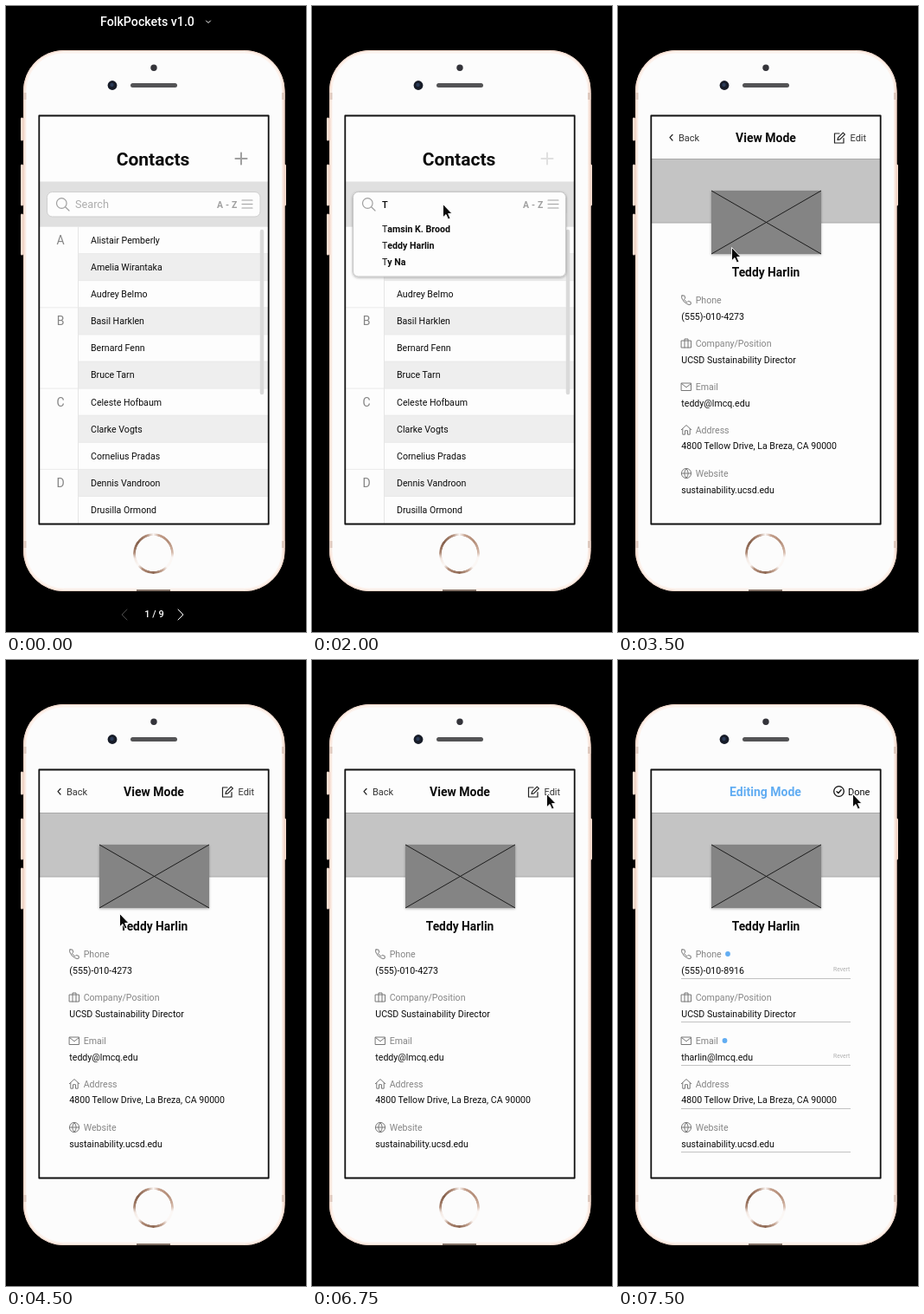
An HTML page for the animation above (8000 ms loop, 347 px wide and 722 px high).

```html
<!DOCTYPE html>
<html lang="en">
<head>
<meta charset="utf-8">
<title>Contacts prototype</title>
<style>
  html, body { margin: 0; width: 100%; height: 100%; overflow: hidden; background: #000; }
  svg { position: absolute; left: 0; top: 0; display: block; }
  text { font: 10.6px Roboto, Arial, sans-serif; fill: #0c0c0c; white-space: pre; }
  .bold { font-weight: 700; }
  .mid { text-anchor: middle; }
  .grey { fill: #858585; }
  .icon { fill: none; stroke-linecap: round; stroke-linejoin: round; }
  .title { font-size: 14px; font-weight: 700; text-anchor: middle; }
  .revert { font-size: 6.8px; fill: #b0b0b0; }

  .home {
    position: absolute; left: 147px; top: 608px; width: 47px; height: 47px; border-radius: 50%;
    background: conic-gradient(#fbf7f5, #c4a08d 18deg, #b38d78 50deg, #d3b7a7 85deg, #fbf7f5 102deg,
      #fbf7f5 135deg, #c9ab9a 150deg, #8f6a55 180deg, #b08b77 215deg, #fbf7f5 232deg, #f3e9e3 255deg,
      #a5806c 275deg, #86614d 305deg, #b28f7c 340deg, #fbf7f5);
    -webkit-mask: radial-gradient(circle, #0000 20.2px, #000 20.8px);
    mask: radial-gradient(circle, #0000 20.2px, #000 20.8px);
  }

  /* Scene changes: search opens at 2 s, card at 3.5 s, editing at 7.25 s */
  .chrome, .idle, .list, .find, .card, .view, .edit, .cursor { animation: 8s step-end infinite; }
  .chrome, .idle { animation-name: untilSearch; }
  .list { animation-name: untilCard; }
  .find { animation-name: search; }
  .card { animation-name: fromCard; }
  .view { animation-name: viewing; }
  .edit { animation-name: editing; }
  .cursor { animation-name: move; }
  @keyframes untilSearch { 0% { visibility: visible } 25%, 100% { visibility: hidden } }
  @keyframes untilCard { 0% { opacity: 1 } 43.75%, 100% { opacity: 0 } }
  @keyframes search { 0% { visibility: hidden } 25% { visibility: visible } 43.75%, 100% { visibility: hidden } }
  @keyframes fromCard { 0% { opacity: 0 } 43.75%, 100% { opacity: 1 } }
  @keyframes viewing { 0% { visibility: visible } 90.625%, 100% { visibility: hidden } }
  @keyframes editing { 0% { visibility: hidden } 90.625%, 100% { visibility: visible } }
  @keyframes move {
    0% { visibility: hidden; transform: translate(256px, 41px) }
    3.125% { visibility: visible; transform: translate(256px, 41px) }
    6.25% { transform: translate(249px, 78px) }
    9.375% { transform: translate(238px, 122px) }
    12.5% { transform: translate(224px, 160px) }
    15.625% { transform: translate(213px, 174px) }
    18.75% { transform: translate(186px, 204px) }
    21.875% { transform: translate(160px, 226px) }
    25% { transform: translate(151px, 228px) }
    28.125% { transform: translate(151px, 238px) }
    31.25% { transform: translate(151px, 261px) }
    34.375% { transform: translate(140px, 271px) }
    37.5% { transform: translate(131px, 278px) }
    53.125% { transform: translate(129px, 271px) }
    56.25% { transform: translate(131px, 292px) }
    59.375% { transform: translate(132px, 326px) }
    62.5% { transform: translate(132px, 368px) }
    65.625% { transform: translate(132px, 398px) }
    68.75% { transform: translate(145px, 433px) }
    71.875% { transform: translate(174px, 387px) }
    75% { transform: translate(215px, 300px) }
    78.125% { transform: translate(253px, 204px) }
    81.25%, 100% { visibility: visible; transform: translate(271px, 154px) }
  }
</style>
</head>
<body>
<svg width="347" height="722" viewBox="0 0 347 722">
  <defs>
    <linearGradient id="rim" x2="1" y2="0">
      <stop stop-color="#f5ddd1"/><stop offset=".012" stop-color="#fdf2ec"/>
      <stop offset=".988" stop-color="#fdf2ec"/><stop offset="1" stop-color="#f3d9cc"/>
    </linearGradient>
    <filter id="shade" x="-10%" y="-15%" width="120%" height="135%">
      <feDropShadow dx="0" dy="1" stdDeviation="1.8" flood-opacity=".32"/>
    </filter>
    <clipPath id="screen"><path d="M39 127H303V597H39Z"/></clipPath>
  </defs>
  <path d="M0 0H347V722H0Z"/>

  <g class="chrome">
    <text class="mid" x="163.5" y="23" style="font-size:14.2px;font-weight:500;fill:#fff">FolkPockets v1.0</text>
    <text class="mid" x="171.5" y="705" style="font-size:11px;font-weight:500;fill:#fff">1 / 9</text>
    <g class="icon" stroke="#fff">
      <path d="M231.5 17L234 19.5L236.5 17"/>
      <path d="M199 696L205 702L199 708"/>
      <path d="M140 696L134 702L140 708" stroke="#4a4a4a"/>
    </g>
  </g>

  <!-- Phone -->
  <path d="M18.5 130V154M18.5 184V229M18.5 241V286M322.5 184V229" stroke="#f4dccf" stroke-width="3" stroke-linecap="round"/>
  <rect x="20" y="51" width="302.5" height="624" rx="47" fill="url(#rim)"/>
  <rect x="20.5" y="51.5" width="301.5" height="623" rx="46.5" fill="none" stroke="#efd3c5"/>
  <path d="M20 104H24M318.5 104H322.5M20 621H24M318.5 621H322.5" stroke="#dfc9be" stroke-width="8"/>
  <rect x="23.5" y="54.5" width="295.5" height="617" rx="43.5" fill="#fcfcfc"/>
  <path d="M151 674H190" stroke="#59483f" stroke-width="1.6"/>
  <circle cx="171" cy="71.3" r="3.7" fill="#34343a"/>
  <circle cx="123" cy="91.5" r="5.4" fill="#171c28"/>
  <circle cx="122.5" cy="91" r="2.2" fill="#2b3b58"/>
  <rect x="144" y="89" width="54" height="5" rx="2.5" fill="#535355"/>
  <path d="M39 127H303V597H39Z" fill="#fdfdfd"/>

  <g clip-path="url(#screen)">
    <g class="list">
      <text class="title" x="170" y="183.5" style="font-size:21px">Contacts</text>
      <g class="icon" stroke-width="2">
        <path d="M272 169.5V182.5M265.5 176H278.5" stroke="#e0e0e0"/>
        <path class="idle" d="M272 169.5V182.5M265.5 176H278.5" stroke="#a0a0a0"/>
      </g>
      <path d="M39 202.5H303V254.5H39Z" fill="#e0e0e0"/>
      <g id="rows"></g>
      <path d="M83.5 254.5V597" stroke="#e6e6e6"/>
      <path d="M296 260V446" stroke="#dadada" stroke-width="4.5" stroke-linecap="round"/>
      <rect x="47.5" y="214.5" width="246.5" height="28.5" rx="6" fill="#fdfdfd" stroke="#cfcfcf"/>
      <g class="find">
        <rect x="47.5" y="214.5" width="246" height="97.5" rx="6" fill="#fdfdfd" stroke="#c6c6c6" filter="url(#shade)"/>
        <text x="81" y="232.5" style="font-size:11px;font-weight:500">T</text>
        <g id="matches"></g>
      </g>
      <text class="idle" x="80" y="233" style="font-size:12.7px;fill:#adadad">Search</text>
      <g class="icon" stroke="#a0a0a0" stroke-width="1.2">
        <circle cx="64.3" cy="227.5" r="5.8"/>
        <path d="M68.6 231.8L73 236M273 224H285M273 228.5H285M273 233H285"/>
      </g>
      <text class="bold" x="244" y="232.5" style="font-size:10.4px;fill:#a0a0a0;letter-spacing:.2px">A - Z</text>
    </g>

    <g class="card">
      <path d="M39 176H303V250H39Z" fill="#c4c4c4"/>
      <path d="M39 176.5H303M39 250H303" stroke="#a9a9a9"/>
      <path d="M108 213H235V286H108Z" fill="#848484" filter="url(#shade)"/>
      <path d="M108 213L235 286M235 213L108 286" stroke="#111" stroke-width=".9"/>
      <text class="title" x="171" y="312" style="font-size:13.8px">Teddy Harlin</text>
      <g id="fields"></g>
      <g class="view">
        <text class="title" x="171" y="156.5">View Mode</text>
        <text x="70" y="155.5" style="font-size:11px;fill:#333">Back</text>
        <text x="268.5" y="155.5" style="font-size:11px;fill:#333">Edit</text>
        <g class="icon" stroke="#222" stroke-width="1.2">
          <path d="M63 148.5L60 151.7L63 155"/>
          <path d="M256 147H250.5V158H261V152.5M254 154.5L254.6 151.8L260.3 146.1L262.4 148.2L256.7 153.9Z"/>
        </g>
      </g>
      <g class="edit">
        <text class="title" x="170.5" y="156.5" style="fill:#62adf2">Editing Mode</text>
        <text x="266" y="155.5" style="font-size:11px">Done</text>
        <g class="icon" stroke="#111" stroke-width="1.3">
          <circle cx="255.5" cy="151.5" r="5.8"/>
          <path d="M253 151.7L254.9 153.5L258.2 149.8"/>
        </g>
      </g>
    </g>
  </g>
  <path d="M38.3 126.5H303.7V597.5H38.3Z" fill="none" stroke="#111" stroke-width="1.8" stroke-linejoin="round"/>

  <g class="cursor">
    <path d="M.5 .5V15.8L4 12.5L6.5 18L9 16.9L6.6 11.5H11Z" fill="#0a0a0a" stroke="#fff" stroke-width=".9"/>
  </g>
</svg>
<div class="home"></div>

<script>
  const fill = (id, items, draw) => {
    document.getElementById(id).innerHTML = items.map(draw).join('');
  };

  const people = ['Alistair Pemberly', 'Amelia Wirantaka', 'Audrey Belmo', 'Basil Harklen', 'Bernard Fenn',
    'Bruce Tarn', 'Celeste Hofbaum', 'Clarke Vogts', 'Cornelius Pradas', 'Dennis Vandroon', 'Drusilla Ormond'];
  const rowHeight = 31.1;

  fill('rows', people, (name, i) => {
    const y = 254.5 + i * rowHeight;
    const first = i % 3 === 0;
    const shade = i % 2 ? `<rect x="84" y="${y}" width="219" height="${rowHeight}" fill="#eeeeee"/>` : '';
    const letter = first ? `<text class="mid grey" x="63" y="${y + 20.6}" style="font-size:14px">${name[0]}</text>` : '';
    return `${shade}<path d="M${first ? 39 : 84} ${y}H303" stroke="#e6e6e6" stroke-width=".8"/>${letter}
      <text x="98" y="${y + 19.4}">${name}</text>`;
  });

  fill('matches', ['Tamsin K. Brood', 'Teddy Harlin', 'Ty Na'], (name, i) =>
    `<text x="81" y="${261 + i * 19}">T<tspan class="bold">${name.slice(1)}</tspan></text>`);

  // Icons sit in a 12 x 12 box
  const fields = [
    { y: 339, label: 'Phone', value: '(555)-010-4273', edited: '(555)-010-8916', dot: 127,
      icon: 'M1 1H3.8L4.8 4L3.4 5.3Q4.6 7.6 6.8 8.7L8.2 7.3L11.2 8.4V11Q10 12 8 11.2Q2.5 9 .8 4Q.2 2 1 1Z' },
    { y: 389, label: 'Company/Position', value: 'UCSD Sustainability Director',
      icon: 'M.5 3H11.5V11H.5ZM4 11V1H8V11' },
    { y: 439, label: 'Email', value: 'teddy@lmcq.edu', edited: 'tharlin@lmcq.edu', dot: 123.5,
      icon: 'M.5 2H11.5V10.5H.5ZM.5 2.5L6 6.8L11.5 2.5' },
    { y: 488.7, label: 'Address', value: '4800 Tellow Drive, La Breza, CA 90000',
      icon: 'M.3 6L6 .8L11.7 6M1.8 5V11.5H4.5V7H7.5V11.5H10.2V5' },
    { y: 539, label: 'Website', value: 'sustainability.ucsd.edu',
      icon: 'M.4 6A5.6 5.6 0 1 1 11.6 6A5.6 5.6 0 1 1 .4 6H11.6M6 .4Q1.5 6 6 11.6Q10.5 6 6 .4' }
  ];

  fill('fields', fields, ({ y, label, value, edited, dot, icon }) => {
    const line = (text, kind = '') => `<text class="${kind}" x="73.3" y="${y + 22.7}">${text}</text>`;
    const changed = edited ? line(edited, 'edit') + `<g class="edit">
      <circle cx="${dot}" cy="${y}" r="2.9" fill="#62adf2"/>
      <text class="revert" x="249" y="${y + 19.5}">Revert</text></g>` : '';
    return `<path class="icon" d="${icon}" transform="translate(73 ${y - 6})" stroke="#777"/>
      <text class="grey" x="89.7" y="${y + 3.9}">${label}</text>
      ${line(value, edited ? 'view' : '')}${changed}
      <path class="edit" d="M73 ${Math.round(y) + 28.5}H269" stroke="#c2c2c2"/>`;
  });
</script>
</body>
</html>
```
